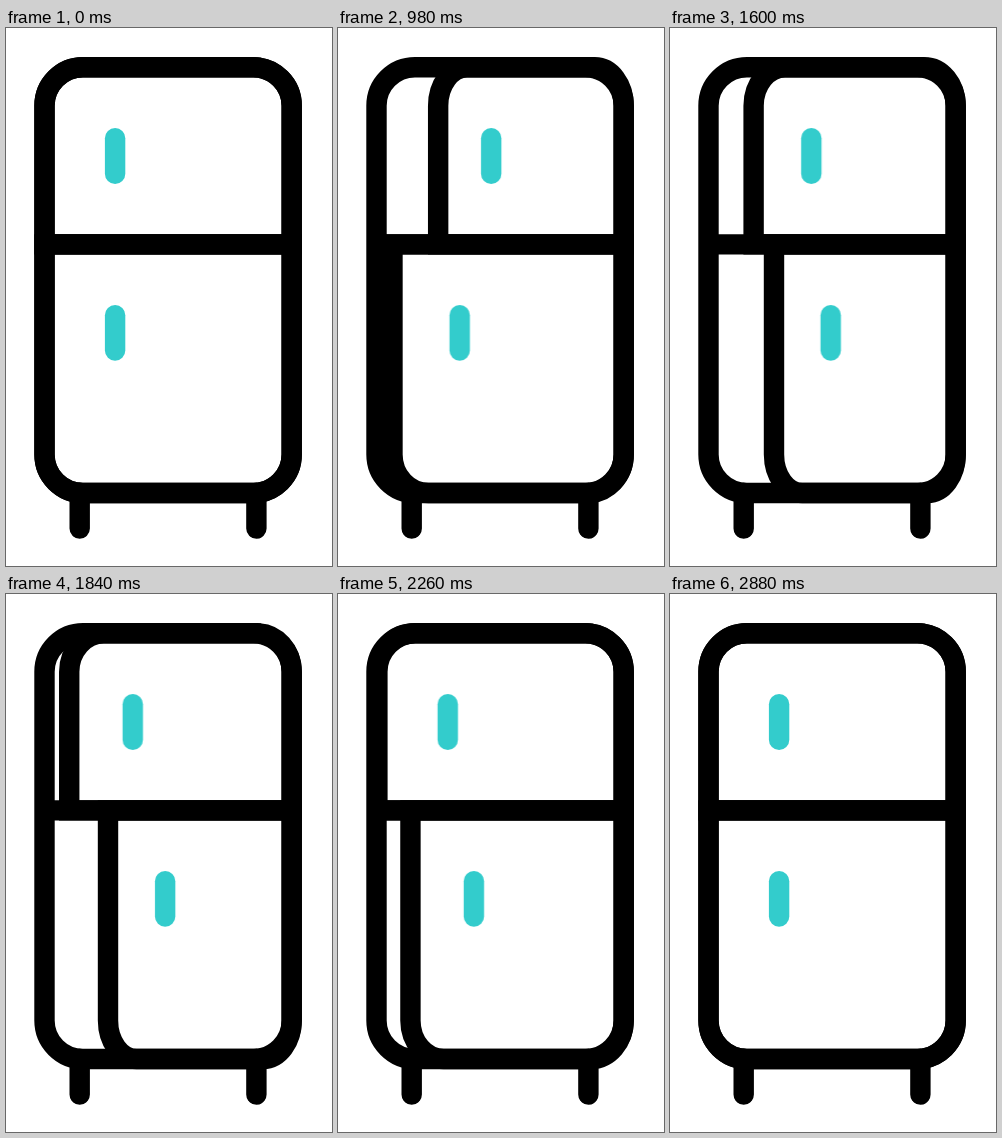
Animation, 326 px wide and 538 px high, one loop 3.6 s. Source, as an HTML page:

```html
<!DOCTYPE html>
<html lang="en">
<head>
<meta charset="utf-8">
<title>Fridge</title>
<style>
  html, body { margin: 0; width: 100%; height: 100%; overflow: hidden; background: #fff; }
  svg { display: block; width: 326px; height: 538px; }
  path, rect { fill: none; stroke: #000; stroke-width: 20.4; }
  .round { stroke-linecap: round; }
  .handle { stroke: #33cccc; }
</style>
</head>
<body>
<svg viewBox="0 0 326 538">
  <path class="round" d="M73.7 465V500.6M250.4 465V500.6"/>
  <rect x="38.5" y="39.3" width="247.2" height="425.7" rx="38.5"/>
  <path d="M38.5 216.4H285.7"/>
  <path id="topDoor"/>
  <path id="lowDoor"/>
  <path id="topHandle" class="round handle" d="M109.1 110.2V145.8"/>
  <path id="lowHandle" class="round handle" d="M109.1 287.2V322.6"/>
</svg>
<script>
  const LOOP = 3600;
  const LEFT = 38.5, RIGHT = 285.7, MID = 216.4, RADIUS = 38.5;
  const SWING = 66;

  // Half of the cabinet outline, squeezed toward its hinge on the right.
  function doorPath(shift, edge) {
    const left = LEFT + shift;
    const rx = RADIUS * (RIGHT - left) / (RIGHT - LEFT);
    const side = Math.sign(MID - edge);
    const turn = edge + side * RADIUS;
    const arc = `A${rx} ${RADIUS} 0 0 ${side > 0 ? 1 : 0}`;
    return `M${left} ${MID}L${left} ${turn}${arc} ${left + rx} ${edge}` +
      `L${RIGHT - rx} ${edge}${arc} ${RIGHT} ${turn}L${RIGHT} ${MID}Z`;
  }

  function swing(id, times, opening, closing, pose) {
    const [start, open, end] = times.map(t => t / LOOP);
    const shut = pose(0);
    document.getElementById(id).animate([
      { ...shut, offset: 0 },
      { ...shut, offset: start, easing: opening },
      { ...pose(SWING), offset: open, easing: closing },
      { ...shut, offset: end },
      { ...shut, offset: 1 }
    ], { duration: LOOP, iterations: Infinity });
  }

  const doors = [
    { name: "top", edge: 39.3, drift: 0.7146, times: [120, 1170, 2350],
      opening: "cubic-bezier(.42,0,.58,1)", closing: "cubic-bezier(.333,0,.63,1)" },
    { name: "low", edge: 465, drift: 0.788, times: [600, 1680, 2880],
      opening: "cubic-bezier(.485,0,.5,1)", closing: "cubic-bezier(.41,0,.57,1)" }
  ];

  for (const { name, edge, drift, times, opening, closing } of doors) {
    document.getElementById(name + "Door").setAttribute("d", doorPath(0, edge));
    swing(name + "Door", times, opening, closing,
      x => ({ d: `path("${doorPath(x, edge)}")` }));
    swing(name + "Handle", times, opening, closing,
      x => ({ transform: `translateX(${x * drift}px)` }));
  }

  // Start every part on the same clock.
  for (const a of document.getAnimations()) a.startTime = document.timeline.currentTime;
</script>
</body>
</html>
```
